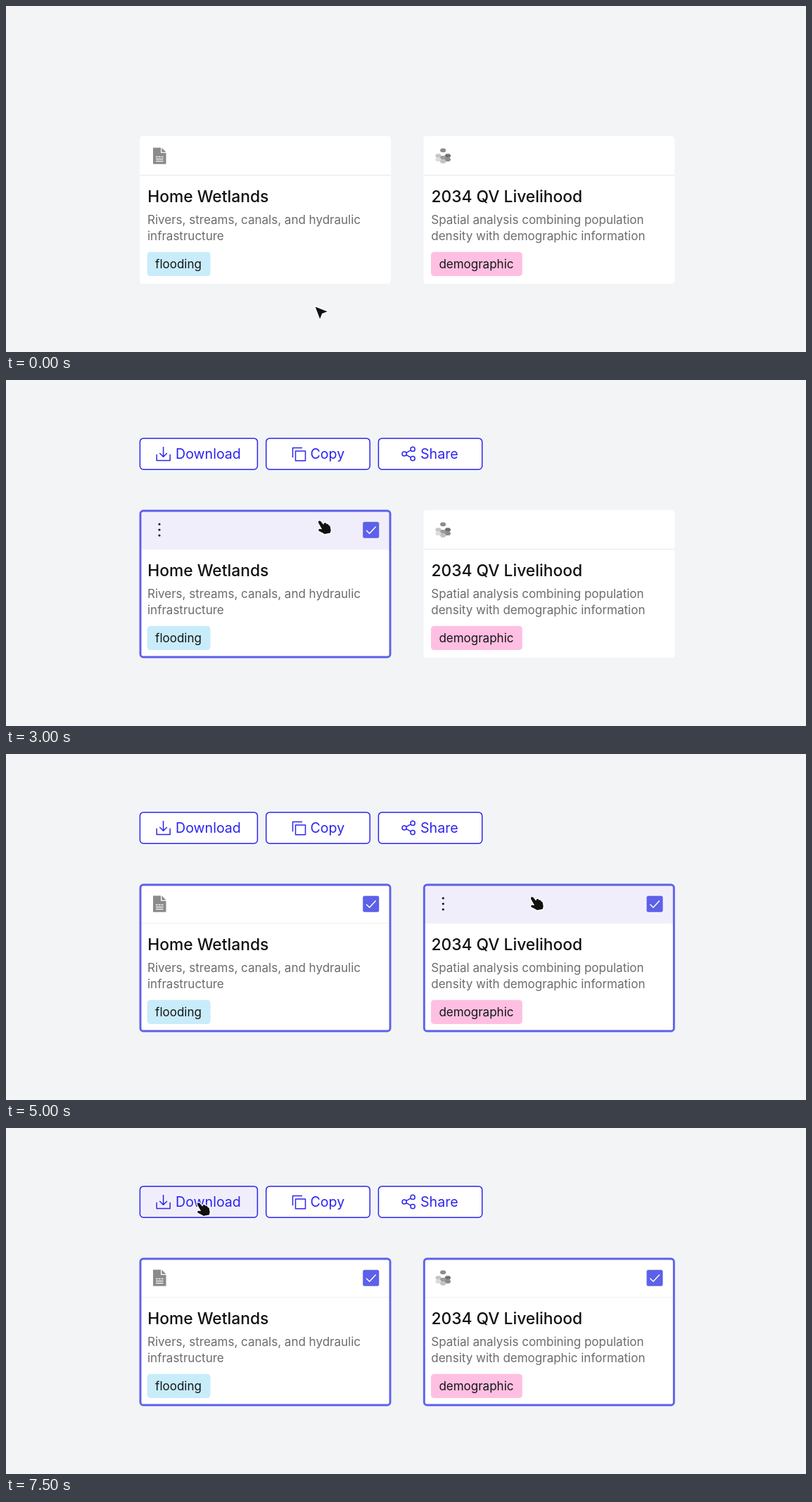
An HTML page for the animation above (9500 ms loop, 1137x492 px).

```html
<!DOCTYPE html>
<html lang="en">
<head>
<meta charset="utf-8">
<title>Selecting cards</title>
<style>
  html, body { margin: 0; width: 100%; height: 100%; overflow: hidden; background: #f2f4f6; }
  svg { display: block; width: 1137px; height: 492px; font-family: Inter, sans-serif; font-optical-sizing: none; }
  .title { font-size: 22.8px; font-weight: 500; fill: #111; }
  .note { font-size: 17px; fill: #6c6c6c; }
  .tag { font-size: 17px; fill: #151515; }
  .label { font-size: 19.6px; }
  .line { fill: none; stroke-width: 1.5; stroke-linejoin: round; }
</style>
</head>
<body>
<svg id="stage" viewBox="0 0 1137 492"></svg>
<script>
const ACCENT = '#5d60e9', BLUE = '#2c25ee', TINT = '#f1eefc';
const LOOP = 9500;

const rect = (x, y, w, h, r, attrs) =>
  `<rect x="${x}" y="${y}" width="${w}" height="${h}" rx="${r}" ${attrs}/>`;
const text = (x, y, cls, str, attrs = '') =>
  `<text x="${x}" y="${y}" class="${cls}" ${attrs}>${str}</text>`;
const path = (d, attrs) => `<path d="${d}" ${attrs}/>`;

const fileIcon =
  path('M209 201.5H220V209H227.5V224.8H209Z M221.3 201.5L227.5 207.8H221.3Z', 'fill="#8b8b8b"') +
  path('M213 214.5H223.5', 'stroke="#fff" stroke-width="1.6" stroke-dasharray="2.8 1.05"') +
  path('M213 217.7H223.5M213 220.7H223.5', 'stroke="#fff" stroke-width="1.3"');

const hex = (x, y, fill) =>
  path(`M${x - 4.5} ${y}l2-2.7h5l2 2.7l-2 2.7h-5Z`, `fill="${fill}"`);
// Drawn in card coordinates, so the left card's position is the base.
const hexIcon = [
  [217.8, 205.2, '#8c8c8c'], [211.2, 213, '#c6c6c6'], [224.6, 213, '#717171'],
  [217.8, 215.7, '#9c9c9c'], [211.2, 218.2, '#dcdcdc'], [224.6, 218.2, '#8c8c8c'],
  [217.8, 221, '#c2c2c2']
].map(h => hex(...h)).join('');

const menuDots = [205, 213, 221]
  .map(y => `<circle cx="218" cy="${y}" r="1.6" fill="#111"/>`).join('');

const cards = [
  { x: 0, icon: fileIcon, title: 'Home Wetlands', tag: 'flooding', tagWidth: 89.8, tagFill: '#c8ecfa',
    notes: ['Rivers, streams, canals, and hydraulic', 'infrastructure'] },
  { x: 403.3, icon: hexIcon, title: '2034 QV Livelihood', tag: 'demographic', tagWidth: 129.8, tagFill: '#ffbfe2',
    notes: ['Spatial analysis combining population', 'density with demographic information'] }
];

// Card modes: '' idle, 'over' title hovered, 'head' header hovered,
// 'pick' selected with header hovered, 'on' selected.
function drawCard(card, mode) {
  const hovered = mode === 'over' || mode === 'head' || mode === 'pick';
  const selected = mode === 'pick' || mode === 'on';
  let out = rect(190, 185, 357, 210, 4.5, 'fill="#fff"');
  if (mode === 'head' || mode === 'pick') out += rect(191, 186, 355, 54.5, 3, `fill="${TINT}"`);
  out += rect(190, 240, 357, 1.4, 0, `fill="${mode ? '#f3f3f4' : '#ebecee'}"`);
  out += hovered ? menuDots : card.icon;
  if (selected) {
    out += rect(507.2, 201.8, 23, 23, 2.5, `fill="${ACCENT}"`) +
      path('M512 213.7L516.6 218.2L525.6 208.6', 'class="line" stroke="#fff"') +
      rect(191, 186, 355, 208, 4, `fill="none" stroke="${ACCENT}" stroke-width="2.9"`);
  } else if (mode) {
    out += rect(507.9, 202.3, 21.6, 21.6, 2, `class="line" stroke="${ACCENT}"`) +
      rect(190.2, 185.2, 356.4, 209.4, 4.5, 'fill="none" stroke="#a9a9ab" stroke-width="1.3"');
  }
  out += text(201.2, 278.8, 'title', card.title);
  out += card.notes.map((n, i) => text(201, 310 + i * 23, 'note', n)).join('');
  out += rect(200.7, 349.8, card.tagWidth, 34.2, 4.5, `fill="${card.tagFill}"`);
  out += text(212.1, 373, 'tag', card.tag);
  return `<g transform="translate(${card.x})">${out}</g>`;
}

const buttons = [
  { x: 190.4, w: 167, textX: 241, label: 'Download',
    icon: 'M223.6 95V109M218.3 104L223.6 109.3L228.9 104M214.2 105.8V114.5H233.2V105.8' },
  { x: 369.7, w: 147.5, textX: 432.5, label: 'Copy',
    icon: 'M411.5 101H425.5V114.7H411.5ZM407.5 110.3V96.5H421' },
  { x: 529.4, w: 147.3, textX: 589, label: 'Share',
    icon: 'M568.7 103.6L575.2 99.8M568.7 106.4L575.2 110.2' +
      [[563, 105], [575, 98.4], [575, 111.6]]
        .map(([x, y]) => `M${x} ${y}a3.1 3.1 0 1 0 6.2 0a3.1 3.1 0 1 0 -6.2 0`).join('') }
];

function drawButton(b, mode) {
  const pressed = mode === 'press';
  const fill = pressed ? ACCENT : mode === 'over' ? TINT : '#fff';
  const ink = pressed ? '#fff' : BLUE;
  return rect(b.x, 82.9, b.w, 44.4, 5, `fill="${fill}" stroke="${pressed ? ACCENT : BLUE}" stroke-width="1.5"`) +
    path(b.icon, `class="line" stroke="${ink}"`) +
    text(b.textX, 112.2, 'label', b.label, `fill="${ink}"`);
}

const pointers = {
  arrow: 'M0 0L17.2 6.8L9.6 9.6L6.6 17.2Z',
  hand: 'M.8 1Q2.3 -.3 4 1L8 6L9 3.4L11.4 3.4L12.2 5L14.5 5L15.4 6.8L17.4 8L18.5 14L17.5 17.7' +
    'L9.7 19.3Q6 16.8 1.2 14.6Q.2 12.8 2.2 12L6 12.4L.8 3.2Z'
};

const drawPointer = (kind, x, y) =>
  path(pointers[kind], `transform="translate(${x} ${y})" fill="#111" stroke="#fff" ` +
    `stroke-width="${kind === 'hand' ? 2.4 : 3.4}" stroke-linejoin="round" paint-order="stroke"`);

const steps = [
  { at: 0, modes: ['', ''], pointer: ['arrow', 439.6, 427.7] },
  { at: 2000, modes: ['over', ''], pointer: ['hand', 463.2, 276.8] },
  { at: 2500, modes: ['head', ''], pointer: ['hand', 443.2, 199.8] },
  { at: 3000, modes: ['pick', ''], bar: true, pointer: ['hand', 443.2, 199.8] },
  { at: 4000, modes: ['on', ''], bar: true, pointer: ['arrow', 563.3, 202.8] },
  { at: 4500, modes: ['on', 'head'], bar: true, pointer: ['hand', 745.2, 202.8] },
  { at: 5000, modes: ['on', 'pick'], bar: true, pointer: ['hand', 745.2, 202.8] },
  { at: 6000, modes: ['on', 'on'], bar: true, pointer: ['arrow', 515, 149.8] },
  { at: 6500, modes: ['on', 'on'], bar: true, download: 'over', pointer: ['hand', 271.2, 105.8] },
  { at: 7000, modes: ['on', 'on'], bar: true, download: 'press', pointer: ['hand', 271.2, 105.8] },
  { at: 7500, modes: ['on', 'on'], bar: true, download: 'over', pointer: ['hand', 271.2, 105.8] }
];

function drawStep(step) {
  let out = rect(0, 0, 1137, 492, 0, 'fill="#f2f4f6"');
  if (step.bar) out += buttons.map((b, i) => drawButton(b, i ? '' : step.download)).join('');
  out += cards.map((c, i) => drawCard(c, step.modes[i])).join('');
  out += drawPointer(...step.pointer);
  stage.innerHTML = out;
  // The underline follows the rendered title width.
  step.modes.forEach((mode, i) => {
    if (mode !== 'over') return;
    const width = stage.querySelectorAll('.title')[i].getComputedTextLength();
    stage.lastElementChild.insertAdjacentHTML('beforebegin',
      rect(201 + cards[i].x, 282.6, width, 1.6, 0, 'fill="#111"'));
  });
}

const stage = document.getElementById('stage');
const start = performance.now();
let shown = null;

function tick() {
  const t = (performance.now() - start) % LOOP;
  const step = steps.filter(s => s.at <= t).pop();
  if (step !== shown) drawStep(shown = step);
  requestAnimationFrame(tick);
}
tick();
</script>
</body>
</html>
```
